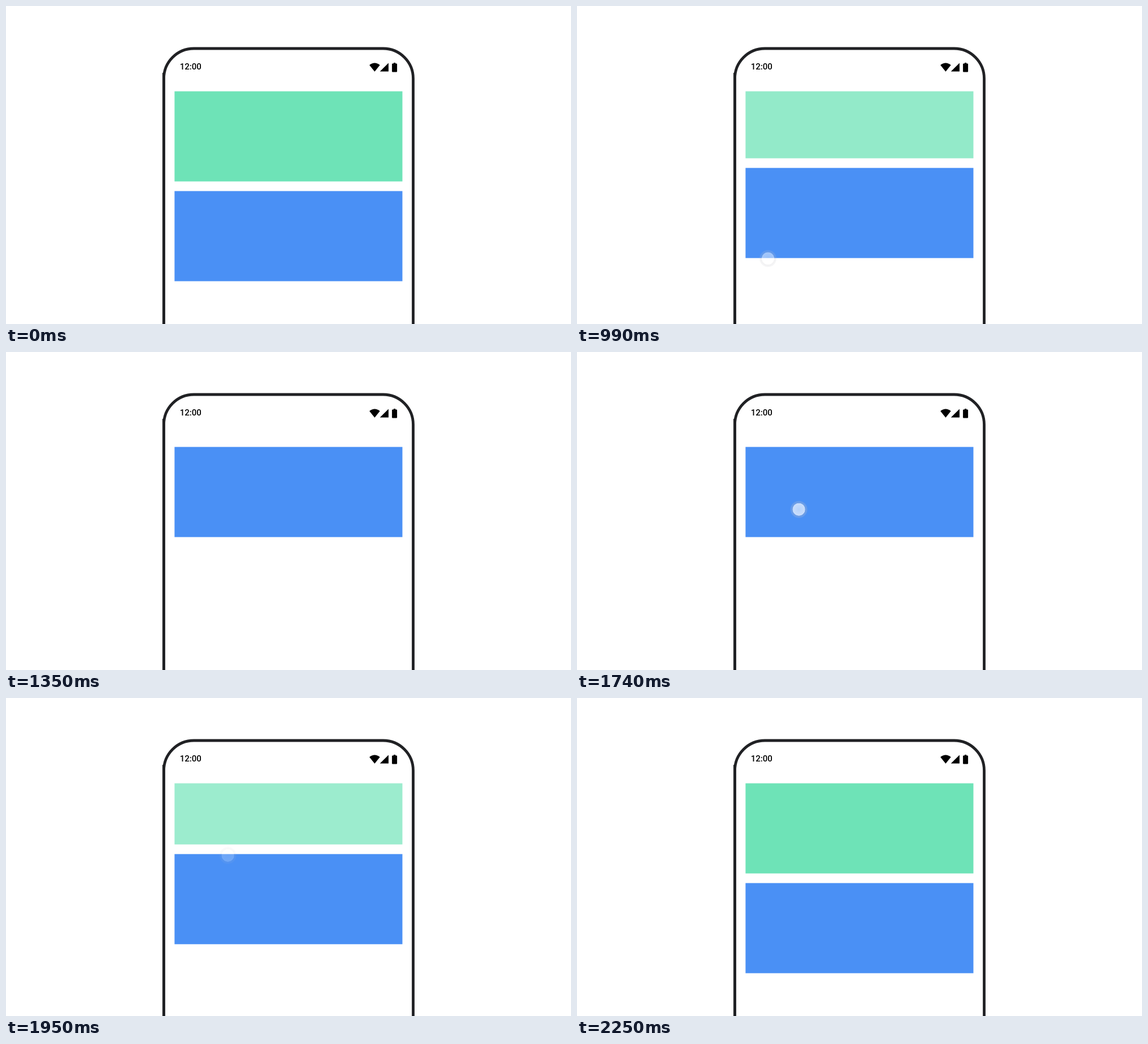
These frames come from a looping animation (997 by 561 pixels, 2700 ms). An HTML page:

```html
<!DOCTYPE html>
<html lang="en">
<head>
<meta charset="utf-8">
<title>Expand and collapse</title>
<style>
  html, body { margin: 0; width: 100%; height: 100%; overflow: hidden; background: #fff; }
  svg { display: block; width: 997px; height: 561px; }
  text { font: 500 15px Roboto, sans-serif; }
</style>
</head>
<body>
<svg viewBox="0 0 997 561">
  <defs>
    <radialGradient id="glow">
      <stop offset="0" stop-color="#fff" stop-opacity=".6"/>
      <stop offset=".69" stop-color="#fff" stop-opacity=".7"/>
      <stop offset=".73" stop-color="#c0c0c6" stop-opacity=".3"/>
      <stop offset=".92" stop-color="#c0c0c6" stop-opacity=".22"/>
      <stop offset="1" stop-color="#c0c0c6" stop-opacity="0"/>
    </radialGradient>
  </defs>

  <g id="phone">
    <path d="M278.5 570V128a53 53 0 0 1 53-53H665.5a53 53 0 0 1 53 53V570" fill="none" stroke="#202124" stroke-width="4.8"/>
    <path d="M276 118h4.9v443h-4.9z" fill="#202124"/>
  </g>

  <g id="status">
    <text x="306.8" y="111.5">12:00</text>
    <path d="M641.3 104.3Q650.5 96.8 659.8 104.3L650.5 115.8z"/>
    <path d="M675 100.5V115.6H659.8z"/>
    <path d="M684 101.5V100h3.2v1.5h1.8q1.1 0 1.1 1.1v12.8q0 1.1-1.1 1.1h-6.8q-1.1 0-1.1-1.1v-12.8q0-1.1 1.1-1.1z"/>
  </g>

  <rect id="green" x="297.4" y="150.5" width="402.1" fill="#6ee3b7"/>
  <rect id="blue" x="297.4" width="402.1" height="159"/>
  <circle id="touch" r="15.5" fill="url(#glow)"/>
</svg>

<script>
const LOOP = 2700, STEP = 30;
const TOP = 150.5, HEIGHT = 159, GAP = 17, FADE = 170;

// Each tap: finger down, block darkened from/to, release (starts the spring), spring settled.
const taps = [
  { down: 870, dark: 870, light: 930, up: 941, end: 1350, x: 337, y: 445.5 },
  { down: 1740, dark: 1770, light: 1830, up: 1833, end: 2250, x: 391.5, y: 277.7 }
];

const [green, blue, touch] = ["green", "blue", "touch"].map(id => document.getElementById(id));
const set = (el, attrs) => Object.entries(attrs).forEach(([k, v]) => el.setAttribute(k, v));

// Critically damped spring going from 1 to 0.
function remaining(t, { up, end }) {
  if (t >= end) return 0;
  const w = Math.max(0, t - up) / 50;
  return (1 + w) * Math.exp(-w);
}

function draw(t) {
  const [hide, show] = taps;
  const open = t < show.down ? remaining(t, hide) : 1 - remaining(t, show);
  const tap = t < show.down ? hide : show;
  const pressed = t >= tap.dark && t < tap.light;
  const fade = Math.min(1, 1 - (t - tap.up) / FADE);

  set(green, { height: HEIGHT * open, opacity: open });
  set(blue, { y: TOP + HEIGHT * open + GAP, fill: pressed ? "#3669b1" : "#4a90f5" });
  set(touch, { cx: tap.x, cy: tap.y, opacity: t < tap.down ? 0 : Math.max(0, fade) });
}

const start = performance.now();
function tick() {
  const t = (performance.now() - start) % LOOP;
  draw(Math.floor(t / STEP) * STEP);
  requestAnimationFrame(tick);
}
tick();
</script>
</body>
</html>
```
